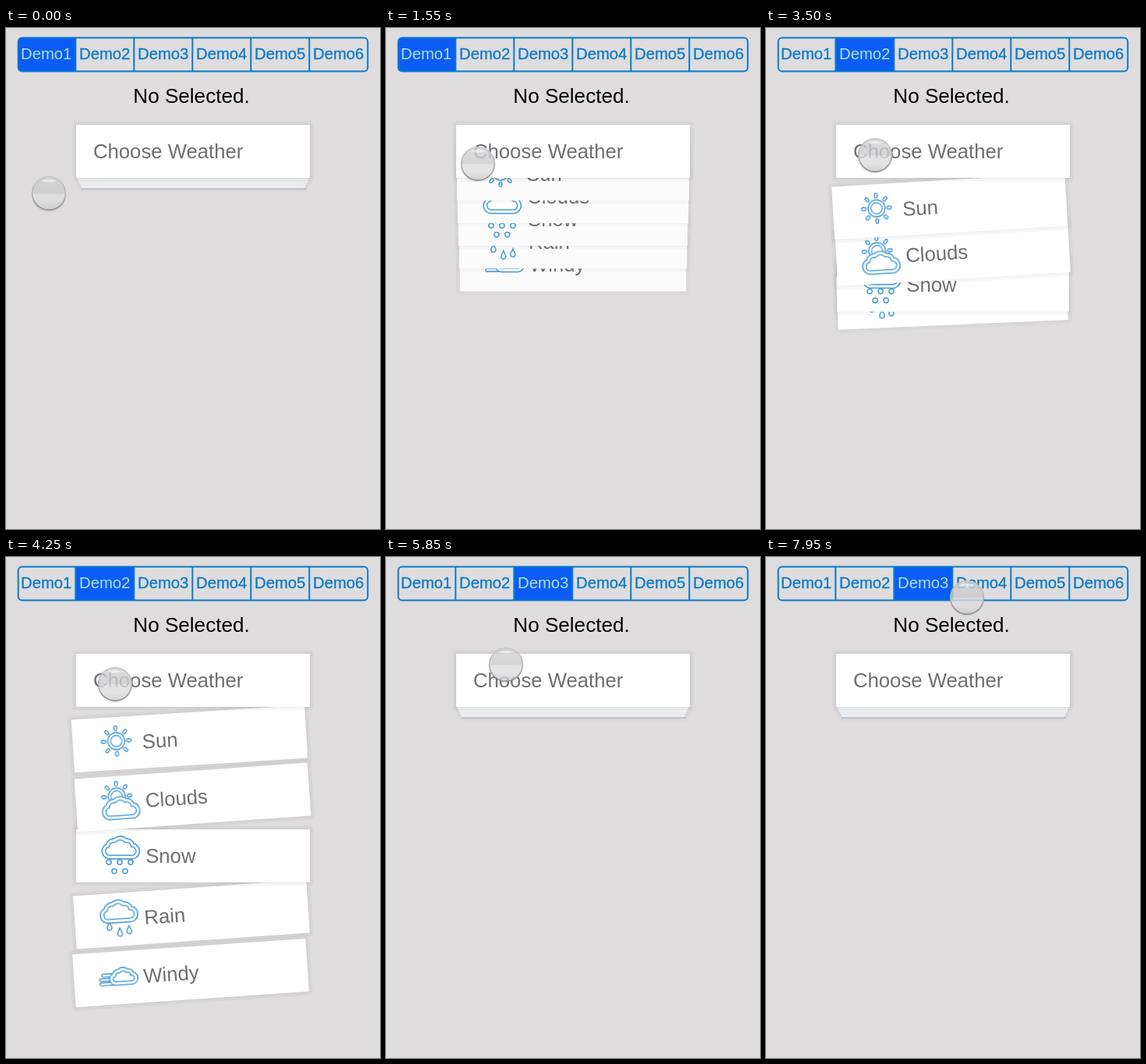
An HTML page that plays this animation: 480x642 px, repeating every 8000 ms.

```html
<!DOCTYPE html>
<html lang="en">
<head>
<meta charset="utf-8">
<title>Drop-down menu demo</title>
<style>
  html, body { margin: 0; width: 100%; height: 100%; overflow: hidden; background: #dedcdd; }
  svg { display: block; width: 100%; height: 100%; font-family: "Liberation Sans", Arial, sans-serif; }
  .label { font-size: 25.7px; fill: #6d6f73; }
  .icon { fill: #fff; stroke: #47a0de; stroke-width: 1.4; filter: drop-shadow(.5px .9px .4px rgba(70, 70, 80, .5)); }
  .icon path { vector-effect: non-scaling-stroke; }
  .icon .rim { stroke-width: 6; }
  .icon .gap { stroke: #fff; stroke-width: 3; fill: none; }
</style>
</head>
<body>
<svg id="stage" viewBox="0 0 480 642">
  <defs>
    <linearGradient id="glass" x1="0" y1="0" x2="0" y2="1">
      <stop offset="0" stop-color="#d4d4d6"/>
      <stop offset=".5" stop-color="#cecfd0"/>
      <stop offset=".52" stop-color="#e0e0e1"/>
      <stop offset=".75" stop-color="#e0e0e2"/>
      <stop offset="1" stop-color="#cacacc"/>
    </linearGradient>
    <linearGradient id="edge" x1="0" y1="0" x2="0" y2="1">
      <stop offset="0" stop-color="#c6c6c8"/>
      <stop offset=".5" stop-color="#b4b4b6"/>
      <stop offset="1" stop-color="#858587"/>
    </linearGradient>
  </defs>
  <rect width="480" height="642" fill="#dedcdd"/>
  <g id="tabs"></g>
  <text x="163.3" y="96" font-size="26.1">No Selected.</text>
  <g id="menu"></g>
  <g id="cursor">
    <circle cy="1.5" r="22.5" fill="#000" opacity=".06"/>
    <circle r="21.3" fill="url(#glass)" fill-opacity=".78" stroke="url(#edge)" stroke-width="1.5"/>
    <path d="M-10-16Q0-20 10-16Q0-13-10-16Z" fill="#fff" opacity=".55"/>
  </g>
</svg>
<script>
const LOOP = 8000, CX = 240, CY = 158, W = 300, H = 68, PITCH = 75, FOLD = 3;
const BLUE = '#0a7ac8';
const $ = id => document.getElementById(id);

function add(parent, tag, attrs = {}, text) {
  const el = document.createElementNS('http://www.w3.org/2000/svg', tag);
  set(el, attrs);
  if (text) el.textContent = text;
  parent.appendChild(el);
  return el;
}
function set(el, attrs) {
  for (const k in attrs) el.setAttribute(k, attrs[k]);
}
const clamp = x => Math.min(1, Math.max(0, x));
const easeOut = x => 1 - (1 - clamp(x)) ** 2;
const smooth = x => x * x * (3 - 2 * x);
const mix = (a, b, k) => a + (b - a) * k;

// Icons, placed relative to the row centre
const pill = (x, y, len, extra = '') =>
  `<rect x="${x}" y="${y}" width="${len}" height="3.4" rx="1.7" ${extra}/>`;
function sun(x, y) {
  let s = `<g transform="translate(${x} ${y})">`;
  for (let a = 0; a < 360; a += 45) s += pill(13.4, -1.7, 5.8, `transform="rotate(${a})"`);
  return s + '<circle r="10.8"/><circle r="7.2"/></g>';
}
const CLOUD = 'M-14 12a8 8 0 0 1-2-15.5a8 8 0 0 1 9-6.5a10 10 0 0 1 15 0a8 8 0 0 1 9 6a8 8 0 0 1-2 16z';
function cloud(x, y, size = 1) {
  const at = `transform="translate(${x} ${y}) scale(${size})" d="${CLOUD}"`;
  return `<path class="rim" ${at}/><path class="gap" ${at}/>`;
}
const flake = ([x, y]) => `<circle cx="${x}" cy="${y}" r="3"/>`;
const drop = ([x, y]) => `<path d="M${x} ${y - 6}c1 3 3 4.5 3 7a3 3 0 0 1-6 0c0-2.5 2-4 3-7z"/>`;
const items = [
  ['Sun', sun(-94, -3)],
  ['Clouds', sun(-97, -8) + cloud(-94, 7.5, .96)],
  ['Snow', cloud(-94, -10, .96) +
    [[-108, 8], [-94, 8], [-80, 8], [-101, 19.5], [-87, 19.5]].map(flake).join('')],
  ['Rain', cloud(-94, -10, .96) + [[-106, 9], [-93, 17.5], [-81, 15]].map(drop).join('')],
  ['Windy', pill(-114, -5.8, 14) + pill(-117, -.3, 17) + pill(-117, 5.2, 20) + cloud(-87, -1.5, .7)]
];

// Each demo: timing and the open pose of row i as [dx, angle]
const randomPose = [[-4.5, -3.6], [-.5, -4], [0, 0], [-2, -4], [-3, -3.9]];
const slantDx = [0, -3.5, -13, -29.5, -54];
const demos = [
  { from: 0, open: 527, close: 1330, dur: 555, lag: 0, pose: () => [0, 0] },
  { from: 2700, open: 3200, close: 4390, dur: 400, lag: 50, pose: i => randomPose[i - 1] },
  { from: 5400, open: 6000, close: 7130, dur: 400, lag: 60, pose: i => [slantDx[i - 1], 4.88 * (i - 1)] }
];

// Pointer stops: time, x, y
const stops = [
  [0, 55, 212], [200, 24, 212], [520, 118, 174], [1880, 118, 174], [2280, 129, 44],
  [2800, 129, 44], [3150, 140, 163], [4900, 140, 163], [5250, 200, 44],
  [5500, 200, 44], [5820, 154, 138], [7450, 154, 138], [7800, 245, 72], [7950, 258, 52], [8000, 258, 52]
];
function pointer(t) {
  const n = Math.max(1, stops.findIndex(s => s[0] > t));
  const a = stops[n - 1], b = stops[n];
  const k = smooth((t - a[0]) / (b[0] - a[0]));
  return [mix(a[1], b[1], k), mix(a[2], b[2], k)];
}

// Segmented control
const marker = add($('tabs'), 'path', { fill: '#0b5df6' });
add($('tabs'), 'rect', { x: 15.7, y: 12.5, width: 448.6, height: 43, rx: 5, fill: 'none', stroke: BLUE, 'stroke-width': 2 });
for (let i = 1; i < 6; i++)
  add($('tabs'), 'path', { d: `M${14.3 + 75 * i} 12V56`, stroke: BLUE, 'stroke-width': 2 });
const tabs = [...Array(6)].map((_, i) => add($('tabs'), 'text',
  { x: 51.7 + 75 * i, y: 39.8, 'text-anchor': 'middle', 'font-size': 20.3 }, 'Demo' + (i + 1)));

function card(label, x, icon) {
  const g = add($('menu'), 'g');
  const soft = add(g, 'rect', { rx: 4 }), tight = add(g, 'rect', { rx: 1 });
  const face = add(g, 'rect', { fill: '#fff' });
  const content = add(g, 'g');
  if (icon) add(content, 'g', { class: 'icon' }).innerHTML = icon;
  add(content, 'text', { class: 'label', x, y: 8.6 }, label);
  return { g, soft, tight, face, content };
}
function box(el, inset, grow) {
  const w = W - 2 * inset + 2 * grow, h = H + 2 * grow;
  set(el, { x: -w / 2, y: -h / 2, width: w, height: h });
}
function place(c, x, y, angle, inset, p) {
  set(c.g, { transform: `translate(${x} ${y}) rotate(${angle})` });
  box(c.soft, inset, 4.5);
  box(c.tight, inset, 1);
  box(c.face, inset, 0);
  const shade = mix(.25, 1, p);
  set(c.soft, { 'fill-opacity': .035 * shade });
  set(c.tight, { 'fill-opacity': .04 * shade });
  const k = clamp(p * 2);
  set(c.face, { fill: `rgb(${mix(239, 255, k)},${mix(240, 255, k)},${mix(244, 255, k)})` });
  set(c.content, { transform: `translate(${inset} 0)` });
}

// Lower rows lie behind the upper ones
const rows = items.map(([name, icon], i) => [name, icon, i + 1]).reverse()
  .map(([name, icon, i]) => ({ i, card: card(name, -60.8, icon) }));
const lip = add(rows[0].card.g, 'path', { d: 'M-143 33.2H145', stroke: '#a9abae', 'stroke-width': 1.3 });
const header = card('Choose Weather', -128);
place(header, CX, CY, 0, 0, 1);

function draw(t) {
  const n = demos.filter(d => t >= d.from).length - 1;
  const d = demos[n];
  tabs.forEach((el, i) => set(el, i === n
    ? { fill: '#aee0dc', stroke: 'none' }
    : { fill: BLUE, stroke: BLUE, 'stroke-width': .3 }));
  const x = 14.3 + 75 * n;
  set(marker, { d: n ? `M${x} 12h75v44h-75z` : 'M90 12H20.5a5 5 0 0 0-5 5v34a5 5 0 0 0 5 5H90z' });

  for (const { i, card } of rows) {
    const late = (i - 1) * d.lag;
    const p = easeOut((t - d.open - late) / d.dur) - easeOut((t - d.close - late) / d.dur);
    const [dx, angle] = d.pose(i);
    place(card, CX + dx * p, CY + i * mix(FOLD, PITCH, p), angle * p, 1.5 * i * (1 - p), p);
    if (i === rows.length) set(lip, { opacity: clamp(1 - p * 4) });
  }
  const [px, py] = pointer(t);
  set($('cursor'), { transform: `translate(${px} ${py})` });
}

const start = performance.now();
function tick() {
  draw((performance.now() - start) % LOOP);
  requestAnimationFrame(tick);
}
draw(0);
requestAnimationFrame(tick);
</script>
</body>
</html>
```
